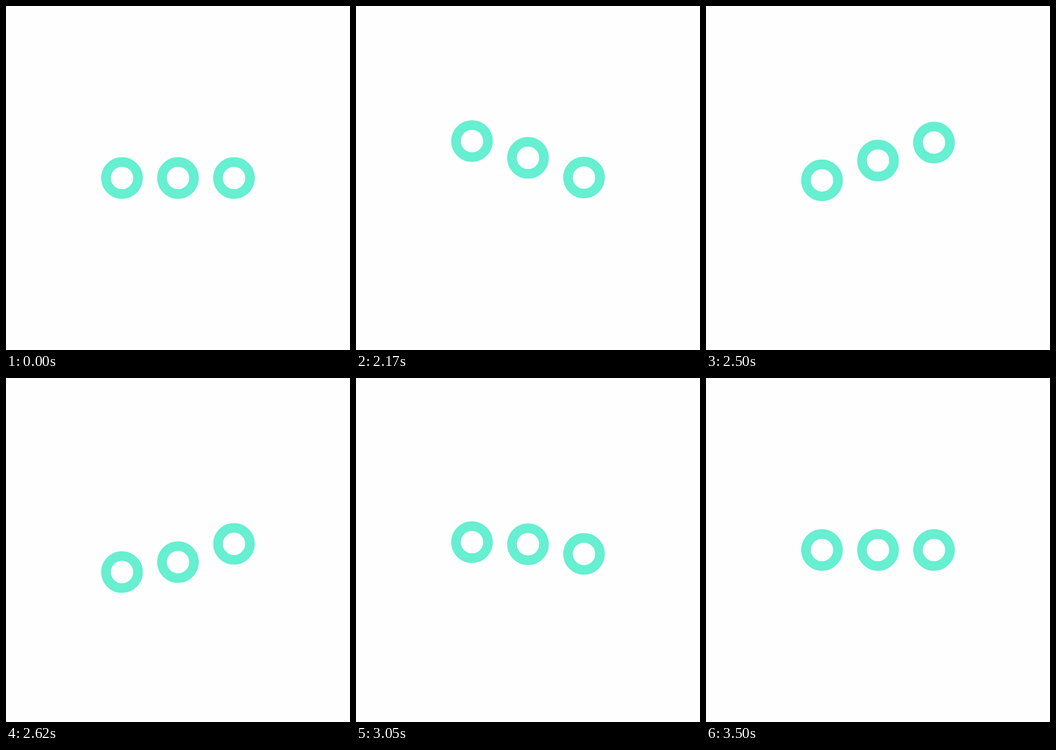
An HTML page that plays this animation: 748 by 748 pixels, repeating every 3.52 s.

```html
<!DOCTYPE html>
<html lang="en">
<head>
<meta charset="utf-8">
<title>Bouncing rings</title>
<style>
  html, body { margin: 0; width: 100%; height: 100%; overflow: hidden; background: #fefefe; }
  svg { display: block; width: 100%; height: 100%; }
</style>
</head>
<body>
<svg viewBox="0 0 430 430">
  <g fill="none" stroke="#66efd0" stroke-width="12">
    <circle cx="145" cy="215" r="20"/>
    <circle cx="215" cy="215" r="20"/>
    <circle cx="285" cy="215" r="20"/>
  </g>
</svg>
<script>
const LOOP = 3520, START = 2000, STAGGER = 80, STEP = 25, REST = 215;

// Bounce path: [ms, offset]
const path = [
  [0, 0], [25, -1.44], [140, -40.8], [220, -49.4], [260, -50], [300, -49.2],
  [340, -44.3], [365, -39.6], [420, -21.8], [500, 2.9], [525, 10.2], [640, 28.7],
  [685, 30], [720, 29.6], [800, 24.7], [890, 4.9], [970, -7.2], [1025, -10],
  [1050, -9.8], [1340, 0]
];

const slope = i => (path[i + 1][1] - path[i][1]) / (path[i + 1][0] - path[i][0]);

// Flat at the ends and turning points, a weighted mean elsewhere
const tangents = path.map(([t], i) => {
  if (i === 0 || i === path.length - 1) return 0;
  const a = slope(i - 1), b = slope(i);
  if (a * b <= 0) return 0;
  const before = t - path[i - 1][0], after = path[i + 1][0] - t;
  return (a * after + b * before) / (before + after);
});

function bounce(t) {
  const last = path.length - 1;
  if (t <= 0 || t >= path[last][0]) return 0;
  const i = path.findIndex(p => p[0] > t) - 1;
  const [t0, y0] = path[i], [t1, y1] = path[i + 1];
  const h = t1 - t0, u = (t - t0) / h, v = 1 - u;
  return v * v * (1 + 2 * u) * y0 + u * u * (1 + 2 * v) * y1
    + h * u * v * (v * tangents[i] - u * tangents[i + 1]);
}

// 40 steps per second, each starting on a whole hundredth
function snap(t) {
  const next = Math.floor(t / STEP) + 1;
  const begins = Math.floor(next * STEP / 10) * 10;
  return Math.min(3500, (t >= begins ? next : next - 1) * STEP);
}

const rings = document.querySelectorAll("circle");

function draw(ms) {
  const t = snap(ms % LOOP) - START;
  rings.forEach((ring, i) => ring.setAttribute("cy", REST + bounce(t - i * STAGGER)));
}

const origin = performance.now();
function tick() {
  draw(performance.now() - origin);
  requestAnimationFrame(tick);
}
draw(0);
requestAnimationFrame(tick);
</script>
</body>
</html>
```
